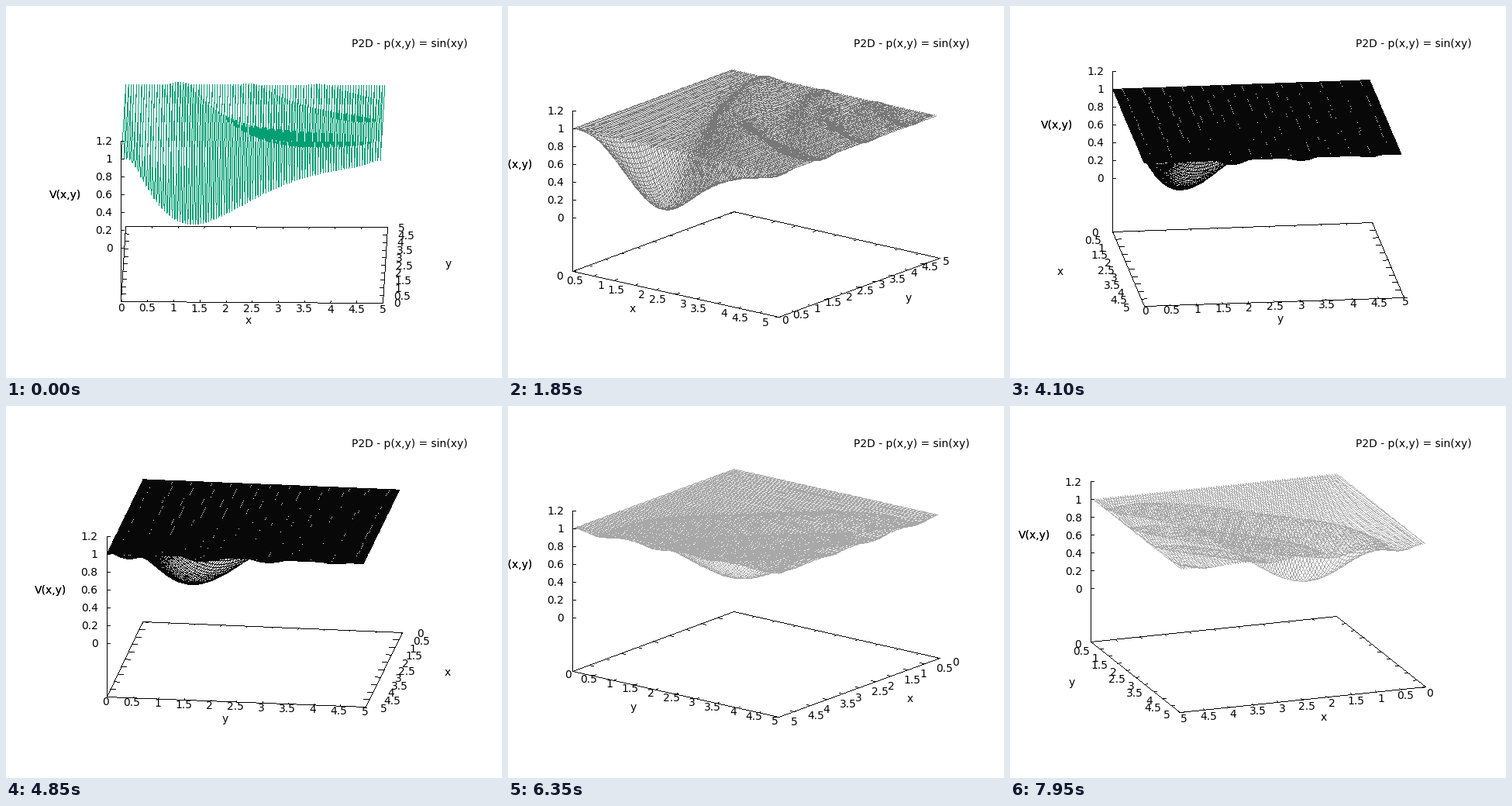
Recreate the animation shown at these times as a matplotlib script. Size 640x480 px, loop 8000 ms.

```python
import numpy as np
import matplotlib.pyplot as plt
from matplotlib.animation import FuncAnimation

W, H, DPI = 640, 480, 100
FRAMES, INTERVAL = 160, 50
N, STEP, SPAN = 100, 0.05, 5.0
STRENGTH = 2.5

# screen geometry of the rotating box
CX, CY = 320.1, 333.2
SIDE, TILT = 337.5, 0.288
Z_UNIT, Z_BASE, Z_TOP = 115.0, -0.6, 1.2

# first frame of each surface colour
INKS = [(0, "#009e73"), (1, "#787878"), (48, "#080808"),
        (98, "#a8a8a8"), (129, "#787878"), (151, "#a8a8a8")]


def solve_poisson():
    """Laplacian(V) = STRENGTH sin(xy), V = 1 on the border, by sine transform."""
    k = np.arange(1, N - 1)
    basis = np.sqrt(2 / (N - 1)) * np.sin(np.pi * np.outer(k, k) / (N - 1))
    lam = (2 * np.cos(np.pi * k / (N - 1)) - 2) / STEP ** 2
    source = STRENGTH * np.sin(np.outer(k, k) * STEP ** 2)
    modes = basis @ source @ basis / (lam[:, None] + lam[None, :])
    v = np.ones((N, N))
    v[1:-1, 1:-1] += basis @ modes @ basis
    return v


GRID = np.arange(N) * STEP
GX, GY = np.meshgrid(GRID, GRID, indexing="ij")
GV = solve_poisson()
# straight strokes from the end of one scan back to the start of the next
RETURN_X = np.stack([GRID[:-1], GRID[1:]], axis=1)
RETURN_Y = np.array([GRID[-1], 0.0])
TICKS = np.arange(0, 5.01, 0.5)
Z_TICKS = np.arange(0, 1.21, 0.2)


def project(x, y, z, c, s):
    u, v = x / SPAN - 0.5, y / SPAN - 0.5
    px = CX + SIDE * (u * c + v * s)
    py = CY + SIDE * TILT * (u * s - v * c) - Z_UNIT * (z - Z_BASE)
    return px, py


def stroke(img, px, py, rgb):
    """Draw one-pixel aliased polylines along the last axis."""
    px, py = np.floor(px + 0.5), np.floor(py + 0.5)
    x0, y0 = px[..., :-1].ravel(), py[..., :-1].ravel()
    dx, dy = np.diff(px).ravel(), np.diff(py).ravel()
    length = np.maximum(np.maximum(abs(dx), abs(dy)), 1)
    for k in range(int(length.max()) + 1):
        t = np.minimum(k / length, 1)
        col = np.floor(x0 + t * dx + 0.5).astype(int)
        row = np.floor(y0 + t * dy + 0.5).astype(int)
        ok = (col >= 0) & (col < W) & (row >= 0) & (row < H)
        img[row[ok], col[ok]] = rgb


def line(img, x0, y0, x1, y1):
    stroke(img, np.array([x0, x1]), np.array([y0, y1]), 0)


def rgb_of(code):
    return [int(code[i:i + 2], 16) for i in (1, 3, 5)]


fig = plt.figure(figsize=(W / DPI, H / DPI), dpi=DPI, facecolor="white")
ax = fig.add_axes([0, 0, 1, 1])
ax.axis("off")
canvas = ax.imshow(np.full((H, W, 3), 255, np.uint8), aspect="auto",
                   interpolation="nearest",
                   extent=(-0.5, W - 0.5, H - 0.5, -0.5))
ax.set_xlim(-0.5, W - 0.5)
ax.set_ylim(H - 0.5, -0.5)


def label(text, ha="center", x=0, y=0):
    return ax.text(x, y, text, ha=ha, va="baseline", fontsize=10,
                   family="DejaVu Sans", color="black")


label("P2D - p(x,y) = sin(xy)", "left", 446, 53)
x_labels = [label(f"{t:g}") for t in TICKS]
y_labels = [label(f"{t:g}") for t in TICKS]
z_labels = [label(f"{t:g}", "right") for t in Z_TICKS]
x_title, y_title = label("x"), label("y")
# overprinted, which makes it look heavier
z_titles = [label("V(x,y)"), label("V(x,y)")]


def place_labels(labels, px, py, dx, dy, aligned):
    ha = "center"
    if aligned:
        ha = "left" if dx > 0 else "right"
        dx += 4 if dx > 0 else -4
    for text, x, y in zip(labels, px, py):
        text.set_position((x + dx, y + dy + 5))
        text.set_ha(ha)


def draw_ticks(img, px, py, dx, dy):
    for x, y in zip(px, py):
        line(img, x, y, x + dx, y + dy)


def draw(frame):
    angle = np.radians(frame + 1)
    c, s = np.cos(angle), np.sin(angle)
    img = np.full((H, W, 3), 255, np.uint8)

    ink = rgb_of([code for start, code in INKS if start <= frame][-1])
    stroke(img, *project(GX, GY, GV, c, s), ink)
    stroke(img, *project(RETURN_X, RETURN_Y, 1.0, c, s), ink)

    corner_x = np.array([0, SPAN, SPAN, 0, 0])
    corner_y = np.array([0, 0, SPAN, SPAN, 0])
    bx, by = project(corner_x, corner_y, Z_BASE, c, s)
    stroke(img, bx, by, 0)

    # x axis: labels on whichever edge is nearer the viewer
    near = 0 if c > 0 else SPAN
    out = -1 if c > 0 else 1
    for edge, sign in ((0, 1), (SPAN, -1)):
        px, py = project(TICKS, edge, Z_BASE, c, s)
        draw_ticks(img, px, py, sign * 7 * s, -sign * 7 * TILT * c)
    px, py = project(TICKS, near, Z_BASE, c, s)
    place_labels(x_labels, px, py, out * 14.6 * s, 7.7 * abs(c), s > 0.6)
    x_title.set_position((px.mean() + out * 86 * s - 3,
                          py.mean() + 24 * abs(c) + 4))

    # y axis: the x = 5 edge always faces the viewer
    for edge, sign in ((0, 1), (SPAN, -1)):
        px, py = project(edge, TICKS, Z_BASE, c, s)
        draw_ticks(img, px, py, sign * 4.7 * c, sign * 4.7 * TILT * s)
    place_labels(y_labels, px, py, 9.5 * c, 5.5 * s, abs(c) > 0.9)
    y_title.set_position((px.mean() + 84 * c - 3, py.mean() + 24 * s + 2.5))

    # z axis stands on the leftmost corner
    left = np.argmin(bx)
    zx, zy = bx[left], by[left]
    line(img, zx, zy, zx, zy - Z_UNIT * (Z_TOP - Z_BASE))
    for text, z in zip(z_labels, Z_TICKS):
        y = zy - Z_UNIT * (z - Z_BASE)
        line(img, zx, y, zx + 4, y)
        text.set_position((zx - 11.5, y + 5))
    for text in z_titles:
        text.set_position((zx - 72.5, zy - Z_UNIT * 1.2 + 4.5))

    canvas.set_data(img)
    return [canvas]


anim = FuncAnimation(fig, draw, frames=FRAMES, interval=INTERVAL,
                     init_func=lambda: draw(0), repeat=True, repeat_delay=0)
plt.show()
```
